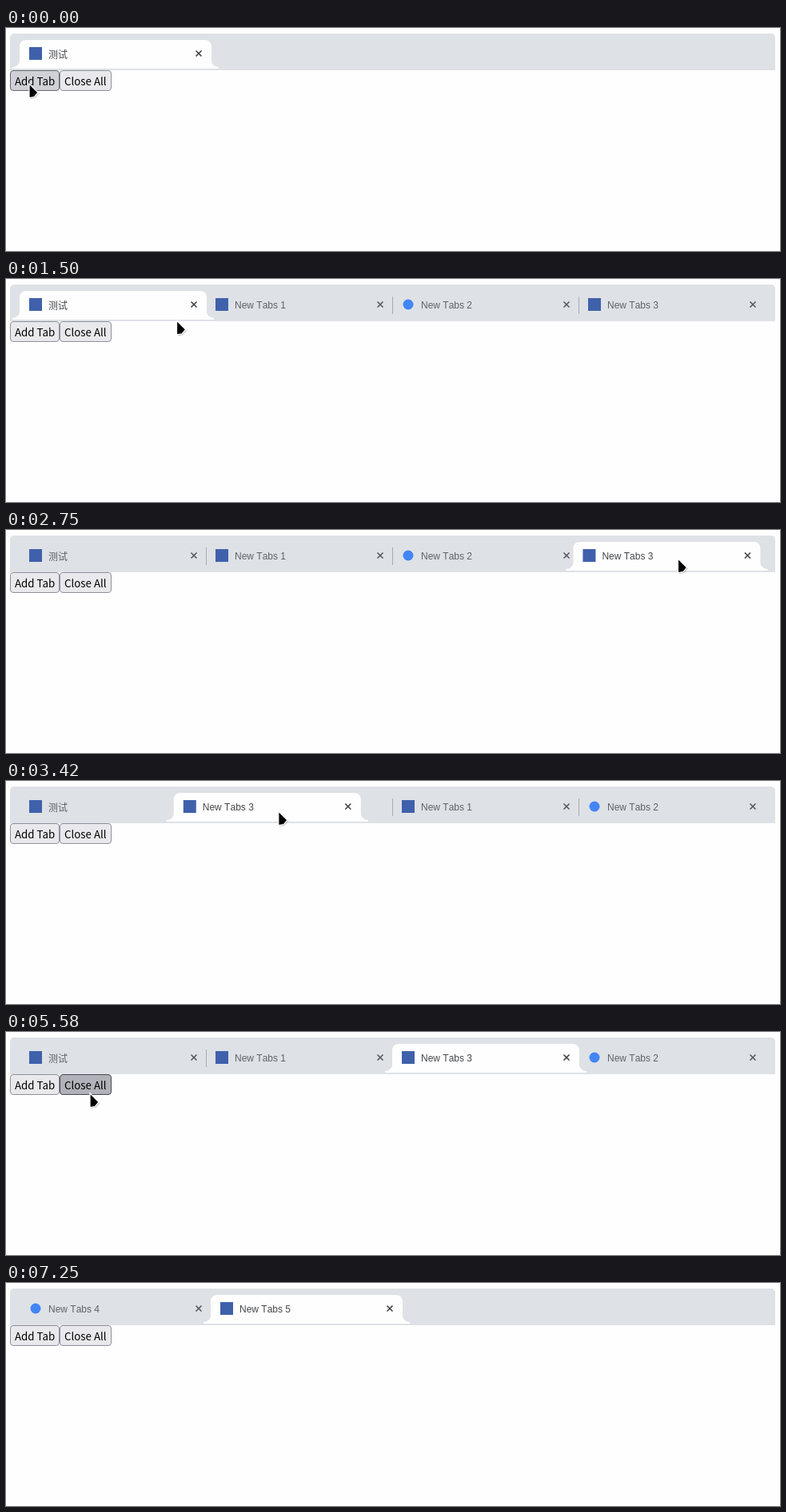
Recreate the animation shown at these times as an HTML page. Size 968 by 280 pixels, loop 8.41 s.

```html
<!DOCTYPE html>
<html lang="en">
<head>
<meta charset="utf-8">
<title>Tab strip</title>
<style>
  html, body { margin: 0; width: 100%; height: 100%; overflow: hidden; background: #fefefe; }
  svg { display: block; }
  text { white-space: pre; }
  .title { font: 12px "Liberation Sans", "Noto Sans CJK SC", sans-serif; font-kerning: none; fill: #5f6368; }
  .on { fill: #45474a; }
  .label { font: 13.333px "Noto Sans CJK SC", "Noto Sans", sans-serif; fill: #000; }
</style>
</head>
<body>
<svg width="968" height="280" viewBox="0 0 968 280">
  <clipPath id="strip"><rect x="5" y="7" width="957" height="46"/></clipPath>
  <rect width="968" height="280" fill="#fefefe"/>
  <path d="M5 53V12a5 5 0 0 1 5-5H957a5 5 0 0 1 5 5V53Z" fill="#dee1e6"/>
  <g id="tabs" clip-path="url(#strip)"></g>
  <g id="buttons"></g>
  <g id="pointer">
    <path d="M1 1.5L12.5 12.5L7.5 18L1 19Z" fill="#555" opacity=".3"/>
    <path d="M0 0L11 11L6.5 16.5L0 17.5Z" fill="#000" stroke="#fff" stroke-width="1.2"/>
  </g>
</svg>
<script>
const LOOP = 8410;
const FIRST = 17;         // left edge of the first tab body
const GRIP = 131;         // pointer distance from the dragged tab's left edge
const GRAB = 2700, TURN = 3470, DROP = 3900;
const CLEAR = 5670;

// [time, x, y] of the pointer tip
const PATH = [
  [0, 29, 70], [1250, 29, 70], [1740, 385, 36], [1850, 385, 36],
  [2080, 525, 39], [2560, 847, 36], [GRAB, 847, 36], [3420, 341, 38],
  [TURN, 335, 40], [DROP, 600, 58], [4050, 600, 60], [4500, 434, 66],
  [4620, 350, 77], [5000, 105, 77], [5720, 105, 77], [5960, 36, 70], [6360, 36, 70],
  [6580, 390, 34], [6700, 390, 34], [7050, 528, 222], [7160, 540, 300], [LOOP, 540, 300]
];

const get = id => document.getElementById(id);
const clamp = v => Math.max(0, Math.min(1, v));
const ease = v => { v = clamp(v); return v * v * (3 - 2 * v); };
const mix = (a, b, k) => a + (b - a) * k;
const last = (list, t) => list.filter(e => e[0] <= t).pop();

// Monotone cubic through the path: flowing past points, resting at turns
function slope(i, axis) {
  if (!i || i === PATH.length - 1) return 0;
  const [a, b, c] = PATH.slice(i - 1, i + 2);
  const m = (b[axis] - a[axis]) / (b[0] - a[0]);
  const n = (c[axis] - b[axis]) / (c[0] - b[0]);
  return m * n > 0 ? 2 * m * n / (m + n) : 0;
}

function along(t, axis) {
  const i = Math.max(0, PATH.findIndex(p => p[0] > t) - 1);
  const a = PATH[i], b = PATH[i + 1], d = b[0] - a[0], k = (t - a[0]) / d;
  return mix(a[axis], b[axis], ease(k)) +
    d * k * (1 - k) * ((1 - k) * slope(i, axis) - k * slope(i + 1, axis));
}

const pointerAt = t => ({ x: along(t, 1), y: along(t, 2) });

// Time when the dragged tab passes halfway between a slot and the next
function passes(slot, from, to) {
  const edge = FIRST + 233 * (slot + .5) + GRIP;
  const side = along(from, 1) > edge;
  for (let i = 0; i < 20; i++) {
    const mid = (from + to) / 2;
    if (along(mid, 1) > edge === side) from = mid; else to = mid;
  }
  return to;
}

const pass2 = passes(2, GRAB, TURN), pass1 = passes(1, GRAB, TURN), back = passes(1, TURN, DROP);

// slots: [time, slot]
const TABS = [
  { name: "测试", from: -1, to: CLEAR, slots: [[-1, 0]], base: 38 },
  { name: "New Tabs 1", from: 300, to: CLEAR, slots: [[0, 1], [pass1, 2], [back, 1]] },
  { name: "New Tabs 2", from: 700, to: CLEAR, slots: [[0, 2], [pass2, 3]], round: true },
  { name: "New Tabs 3", from: 1080, to: CLEAR, slots: [[0, 3], [pass2, 2], [pass1, 1], [back, 2]], drag: true },
  { name: "New Tabs 4", from: 6050, to: LOOP, slots: [[0, 0]], round: true },
  { name: "New Tabs 5", from: 6300, to: LOOP, slots: [[0, 1]] }
];

// [time, active tab]
const ACTIVE = [[0, 0], [1800, 1], [2640, 3], [CLEAR, -1], [6640, 5]];

const BUTTONS = [
  { text: "Add Tab", x: 5, w: 62, clicks: [300, 700, 1080, 6050, 6300] },
  { text: "Close All", x: 67, w: 65, clicks: [CLEAR] }
];

function tabLeft(tab, t, step) {
  const now = last(tab.slots, t);
  const home = FIRST + now[1] * step;
  if (tab.drag && t >= GRAB) {
    if (t < DROP) return along(t, 1) - GRIP;
    return mix(along(DROP, 1) - GRIP, home, ease((t - DROP) / 120));
  }
  const before = tab.slots[tab.slots.indexOf(now) - 1];
  return before ? mix(FIRST + before[1] * step, home, ease((t - now[0]) / 120)) : home;
}

function shape(x, w, fill) {
  const r = x + w;
  return `<path fill="${fill}" d="M${x - 9} 51v-2C${x - 4.5} 49 ${x} 45.5 ${x} 41V23` +
    `C${x} 18.5 ${x + 3.5} 15 ${x + 8} 15H${r - 8}C${r - 3.5} 15 ${r} 18.5 ${r} 23V41` +
    `C${r} 45.5 ${r + 4.5} 49 ${r + 9} 49v2Z"/>`;
}

function drawTab({ tab, x, slot, active, hover, quiet, rise }, w) {
  const body = active ? shape(x, w, "#fefefe") : hover ? shape(x, w, "#eceff3") : "";
  const line = !active && !quiet && slot ? `<rect x="${x}" y="22" width="1" height="22" fill="#a9adb0"/>` : "";
  const icon = tab.round
    ? `<circle cx="${x + 20}" cy="32" r="6.5" fill="#4285f4"/>`
    : `<rect x="${x + 12}" y="24" width="16" height="16" fill="#3f61ab"/>`;
  const c = x + w - 16;
  const cross = `<path d="M${c - 3.5} 28.5l7 7m0-7l-7 7" stroke="${active ? "#3c4043" : "#55585c"}" stroke-width="1.6"/>`;
  return `<g transform="translate(0 ${rise})">${body}${line}${icon}` +
    `<text class="title${active ? " on" : ""}" x="${x + 36}" y="${tab.base || 37}">${tab.name}</text>${cross}</g>`;
}

function drawButton(b, t, p) {
  const over = p.x >= b.x && p.x < b.x + b.w && p.y >= 53 && p.y < 79;
  const down = b.clicks.some(c => t >= c - 90 && t < c);
  const [fill, edge] = down ? ["#b1b1b9", "#484851"] : over ? ["#d0d0d7", "#676774"] : ["#e9e9ed", "#8f8f9d"];
  return `<rect x="${b.x + .5}" y="53.5" width="${b.w - 1}" height="25" rx="3.5" fill="${fill}" stroke="${edge}"/>` +
    `<text class="label" x="${b.x + 6}" y="72">${b.text}</text>`;
}

function draw(t) {
  const p = pointerAt(t);
  const open = TABS.filter(tab => t >= tab.from && t < tab.to);
  const step = Math.min(239, Math.floor(932 / Math.max(1, open.length)));
  const w = step + 1;
  const active = TABS[last(ACTIVE, t)[1]];
  const dragging = t >= GRAB && t < DROP;
  const items = open.map(tab => {
    const x = tabLeft(tab, t, step);
    return {
      tab, x, slot: last(tab.slots, t)[1], active: tab === active,
      hover: !dragging && tab !== active && p.y >= 15 && p.y < 51 && p.x >= x && p.x < x + w,
      rise: tab.from < 0 ? 0 : 10 * (1 - ease((t - tab.from) / 120))
    };
  });
  const hot = items.find(i => i.hover);
  for (const i of items) i.quiet = hot && (i === hot || i.slot === hot.slot + 1);
  items.sort((a, b) => a.active - b.active || a.hover - b.hover);
  get("tabs").innerHTML = items.map(i => drawTab(i, w)).join("");
  get("buttons").innerHTML = BUTTONS.map(b => drawButton(b, t, p)).join("");
  get("pointer").setAttribute("transform", `translate(${p.x} ${p.y})`);
}

const start = performance.now();
function tick() {
  draw((performance.now() - start) % LOOP);
  requestAnimationFrame(tick);
}
tick();
</script>
</body>
</html>
```
